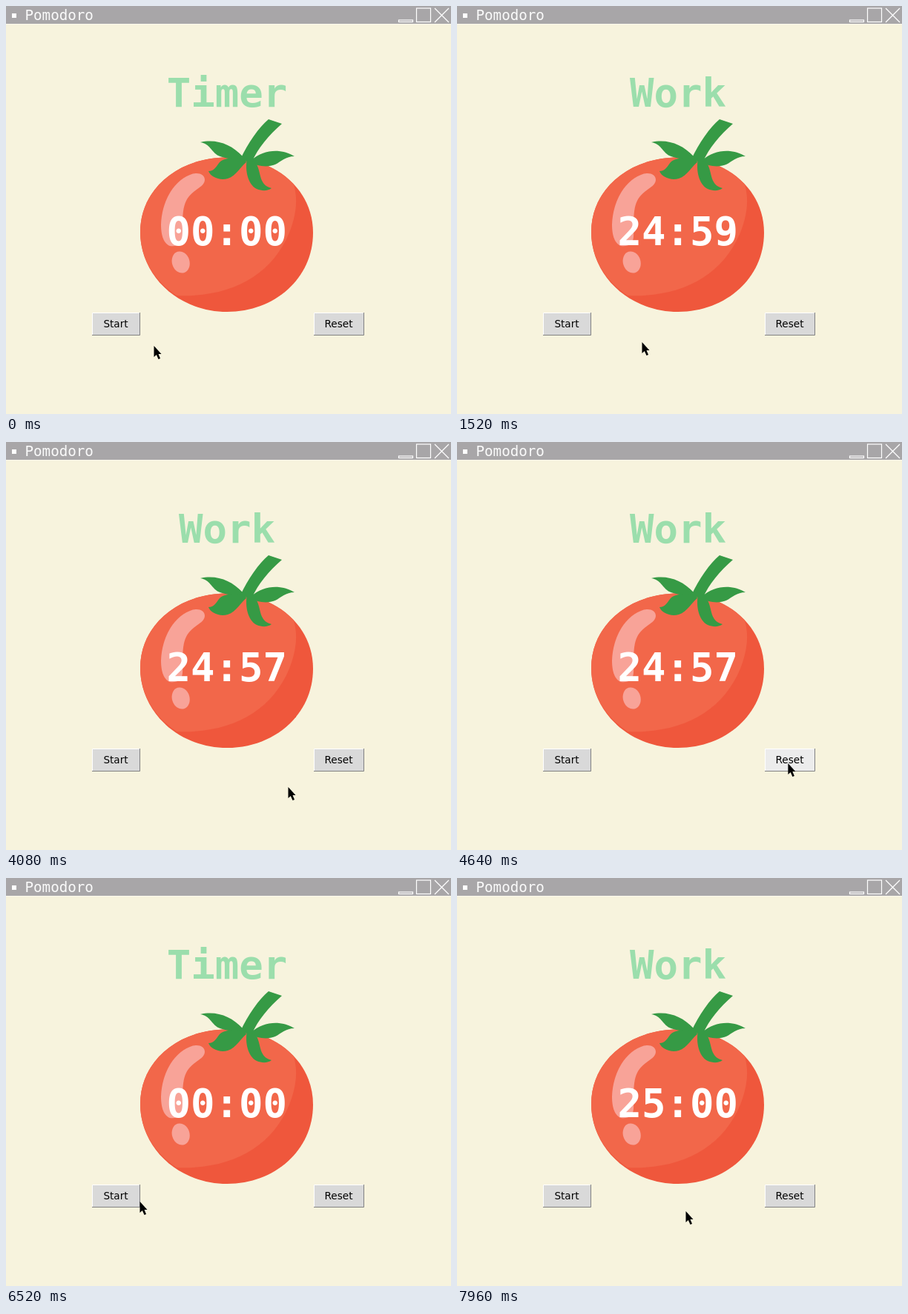
Recreate the animation shown at these times as an HTML page. Size 600 by 551 pixels, loop 8000 ms.

```html
<!DOCTYPE html>
<html lang="en">
<head>
<meta charset="utf-8">
<title>Pomodoro</title>
<style>
html, body { margin: 0; width: 100%; height: 100%; overflow: hidden; background: #f7f3dd; }
svg { display: block; width: 100vw; height: 100vh; }
.mono { font-family: "DejaVu Sans Mono", monospace; }
.big { font-size: 54px; font-weight: bold; text-anchor: middle; }
.label { font: 13.6px "DejaVu Sans", sans-serif; text-anchor: middle; }
</style>
</head>
<body>
<svg viewBox="0 0 600 551">
  <rect width="600" height="551" fill="#f7f3dd"/>

  <g id="titlebar">
    <rect width="600" height="25" fill="#faf8ec"/>
    <rect width="600" height="24" fill="#a8a6a8"/>
    <rect x="8" y="10" width="6" height="6" fill="#fff"/>
    <text class="mono" x="25.5" y="19" font-size="19.2" fill="#fafafa">Pomodoro</text>
    <g fill="none" stroke="#fff" stroke-width="1.2">
      <rect x="529.5" y="19" width="19" height="2.5"/>
      <rect x="553.5" y="3" width="19" height="18.5"/>
      <path d="M578 3L597 22M597 3L578 22"/>
    </g>
  </g>

  <g id="tomato">
    <path fill="#ef573c" d="M298 204.500C365 204.500 414 249 414 306C414 368 362 413 298 413C234 413 181 366 181 305C181 248 231 204.500 298 204.500Z"/>
    <path fill="#f2674a" d="M298 204.500C335 204.500 366 218 388 241C394 262 391 283 382 306C358 364 303 394 230 391C200 371 181 341 181 305C181 248 231 204.500 298 204.500Z"/>
    <path fill="#f8a398" d="M248 228C257 224 268 226 268 235C267 246 251 247 243 263C236 277 239 298 238 312C237 322 231 325 221 324C211 320 209 306 209 295C210 265 225 237 248 228Z"/>
    <ellipse cx="235.700" cy="346" rx="11.800" ry="14.800" transform="rotate(-17 235.700 346)" fill="#f8a398"/>
    <g fill="#369a45">
      <path d="M316 207C327 184 340 165 354 153L372 159C354 175 340 191 331 212Z"/>
      <path d="M262 184C284 179 304 187 319 203L317 209C306 206 294 206 286 202C277 197 275 186 262 184Z"/>
      <path d="M322 206C309 204 294 205 288 211C283 217 281 223 273 223C276 231 288 236 299 233C311 229 316 217 324 211Z"/>
      <path d="M325 206C322 222 326 241 338 247C345 250 353 250 358 246C349 244 345 238 343 230C341 221 339 213 333 206Z"/>
      <path d="M330 209C341 199 354 195 368 196C377 197 384 200 389 203C377 203 371 210 363 214C356 217 347 217 339 215Z"/>
    </g>
  </g>

  <text id="mode" class="mono big" x="298" y="136" fill="#9bdeac"></text>
  <text id="clock" class="mono big" x="297.800" y="323.300" fill="#fff"></text>

  <g id="start"></g>
  <g id="reset"></g>

  <path id="cursor" d="M-.5 -1V14L2.800 11L5.500 17L8 16L5.500 10H9.500Z"/>
</svg>

<script>
const LOOP = 8000, STEP = 40, BEAT = 1240;
const START = [560, 7360], RESET = 5480;
const $ = id => document.getElementById(id);

const HOME = { x: 200, y: 460 };
const MOVES = [
  { from: 0, to: 360, x: 148, y: 438 },
  { from: 720, to: 1480, x: 250, y: 455 },
  { from: 3040, to: 3520, x: 291, y: 468 },
  { from: 3520, to: 4080, x: 381, y: 467 },
  { from: 4080, to: 4760, x: 461, y: 428 },
  { from: 5760, to: 6520, x: 181, y: 438 },
  { from: 6520, to: 6720, x: 146, y: 440 },
  { from: 7600, to: 7960, x: 309, y: 451 }
];

function makeButton(id, x, w, label) {
  const y = 414, h = 31;
  $(id).innerHTML =
    `<rect x="${x}" y="${y}" width="${w}" height="${h}" fill="#d9d9d9"/>
     <path d="M${x + .5} ${y + h}V${y + .5}H${x + w}" fill="none" stroke="#fff"/>
     <path d="M${x} ${y + h - .5}H${x + w - .5}V${y}" fill="none" stroke="#828282"/>
     <text class="label" x="${x + w / 2 - .5}" y="434">${label}</text>`;
  const face = $(id).querySelector("rect");
  return p => {
    const over = p.x >= x && p.x < x + w - 1 && p.y >= y && p.y < y + h;
    face.setAttribute("fill", over ? "#ececec" : "#d9d9d9");
  };
}

const buttons = [
  makeButton("start", 116, 65, "Start"),
  makeButton("reset", 415, 68, "Reset")
];

// Each finished move adds its full offset, the current one a part of it
function pointerAt(t) {
  let { x, y } = HOME;
  for (const m of MOVES) {
    const k = Math.min(1, Math.max(0, (t - m.from) / (m.to - m.from)));
    x += (m.x - x) * k;
    y += (m.y - y) * k;
  }
  return { x, y };
}

const beats = t => Math.floor((t + 160) / BEAT);
const two = n => String(n).padStart(2, "0");

function timerAt(t) {
  const click = START.filter(s => s <= t).pop();
  const running = click !== undefined && !(click < RESET && t >= RESET);
  const left = running ? 25 * 60 - beats(t) + beats(click) : 0;
  return {
    mode: running ? "Work" : "Timer",
    clock: two(Math.floor(left / 60)) + ":" + two(left % 60)
  };
}

function draw(t) {
  const { mode, clock } = timerAt(t);
  const p = pointerAt(t);
  $("mode").textContent = mode;
  $("clock").textContent = clock;
  $("cursor").setAttribute("transform", `translate(${p.x} ${p.y})`);
  buttons.forEach(hover => hover(p));
}

const begin = performance.now();
function tick() {
  const t = (performance.now() - begin) % LOOP;
  draw(Math.floor(t / STEP) * STEP);
  requestAnimationFrame(tick);
}
tick();
</script>
</body>
</html>
```
